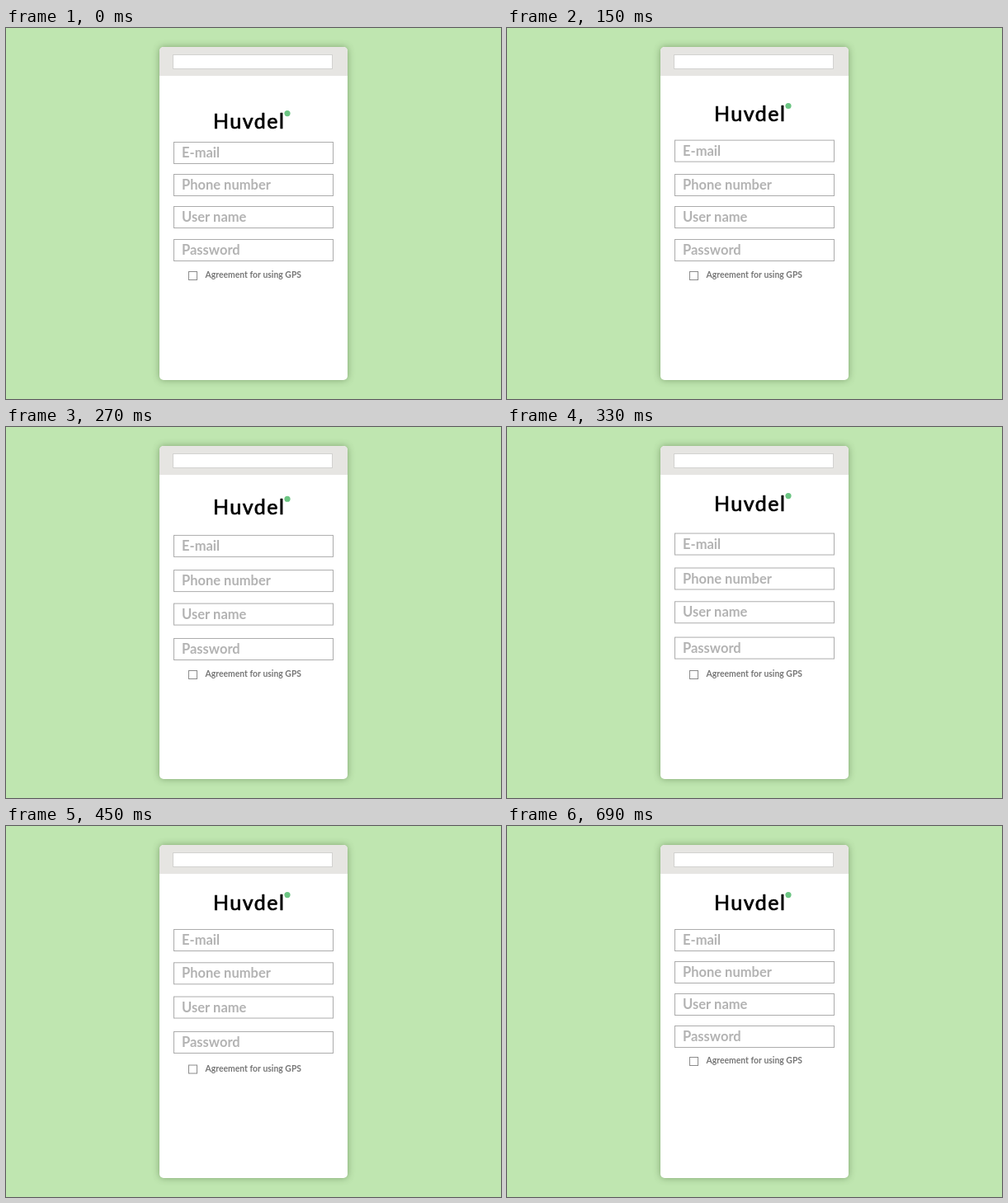
These frames come from a looping animation (600 by 450 pixels, 0.93 s). An HTML page with a canvas:

```html
<!DOCTYPE html>
<html lang="en">
<head>
<meta charset="utf-8">
<title>Sign-up form</title>
<style>
  html, body { margin: 0; width: 100%; height: 100%; overflow: hidden; background: #bfe6b0; }
  canvas { display: block; width: 600px; height: 450px; }
</style>
</head>
<body>
<canvas id="stage" width="600" height="450"></canvas>
<script>
const ctx = document.getElementById('stage').getContext('2d');
const LOOP = 930;
const STEP = 30;
const HELD_STEP = 16; // the motion pauses for this one step

// y: resting top; rise: distance in px; start and length in steps
const title = { y: 122, rise: 20, start: 0, length: 11 };
const fields = [
  { label: 'E-mail', y: 138.5, rise: 13, start: 3, length: 11 },
  { label: 'Phone number', y: 177.5, rise: 13, start: 6, length: 10 },
  { label: 'User name', y: 216.5, rise: 13, start: 7, length: 11 },
  { label: 'Password', y: 256.5, rise: 14, start: 10, length: 10 }
];
const consent = { y: 295.5, rise: 15, start: 11, length: 11 };

function position(item, step) {
  const progress = Math.min(1, Math.max(0, (step - item.start) / item.length));
  return item.y - item.rise * progress;
}

function outline(x, y, w, h, color) {
  ctx.strokeStyle = color;
  ctx.lineWidth = 1;
  ctx.strokeRect(x, y, w, h);
}

function text(label, x, y, font, color) {
  ctx.font = font;
  ctx.fillStyle = color;
  ctx.fillText(label, x, y);
}

function drawPhone() {
  ctx.fillStyle = '#bfe6b0';
  ctx.fillRect(0, 0, 600, 450);

  ctx.save();
  ctx.shadowColor = 'rgba(50, 80, 35, 0.45)';
  ctx.shadowBlur = 8;
  ctx.fillStyle = '#fff';
  ctx.beginPath();
  ctx.roundRect(186, 23, 228, 404, 5);
  ctx.fill();
  ctx.restore();

  ctx.fillStyle = '#e6e5e2';
  ctx.beginPath();
  ctx.roundRect(186, 23, 228, 35, [5, 5, 0, 0]);
  ctx.fill();

  ctx.fillStyle = '#fff';
  ctx.fillRect(202, 32, 194, 18);
  outline(202.5, 32.5, 193, 17, '#d2d2d0');
}

function drawTitle(y) {
  ctx.save();
  ctx.letterSpacing = '1.5px';
  ctx.lineJoin = 'round';
  ctx.lineWidth = 0.7;
  ctx.strokeStyle = '#000';
  text('Huvdel', 251, y, '25px Lato, sans-serif', '#000');
  ctx.strokeText('Huvdel', 251, y);
  ctx.restore();

  ctx.fillStyle = '#6cc583';
  ctx.beginPath();
  ctx.arc(341, y - 18.4, 3.6, 0, Math.PI * 2);
  ctx.fill();
}

function drawField(label, y) {
  outline(203.5, y, 193, 26, '#acacac');
  text(label, 213, y + 18.5, 'bold 16.5px Lato, sans-serif', '#b3b3b3');
}

function drawConsent(y) {
  outline(221.5, y, 10, 10, '#8c8c8c');
  text('Agreement for using GPS', 241.5, y + 7.8, 'bold 10.4px Lato, sans-serif', '#777');
}

function draw(now) {
  const tick = Math.floor((now % LOOP) / STEP);
  const step = tick < HELD_STEP ? tick : tick - 1;
  drawPhone();
  drawTitle(position(title, step));
  for (const field of fields) drawField(field.label, position(field, step));
  drawConsent(position(consent, step));
  requestAnimationFrame(draw);
}

draw(performance.now());
</script>
</body>
</html>
```
